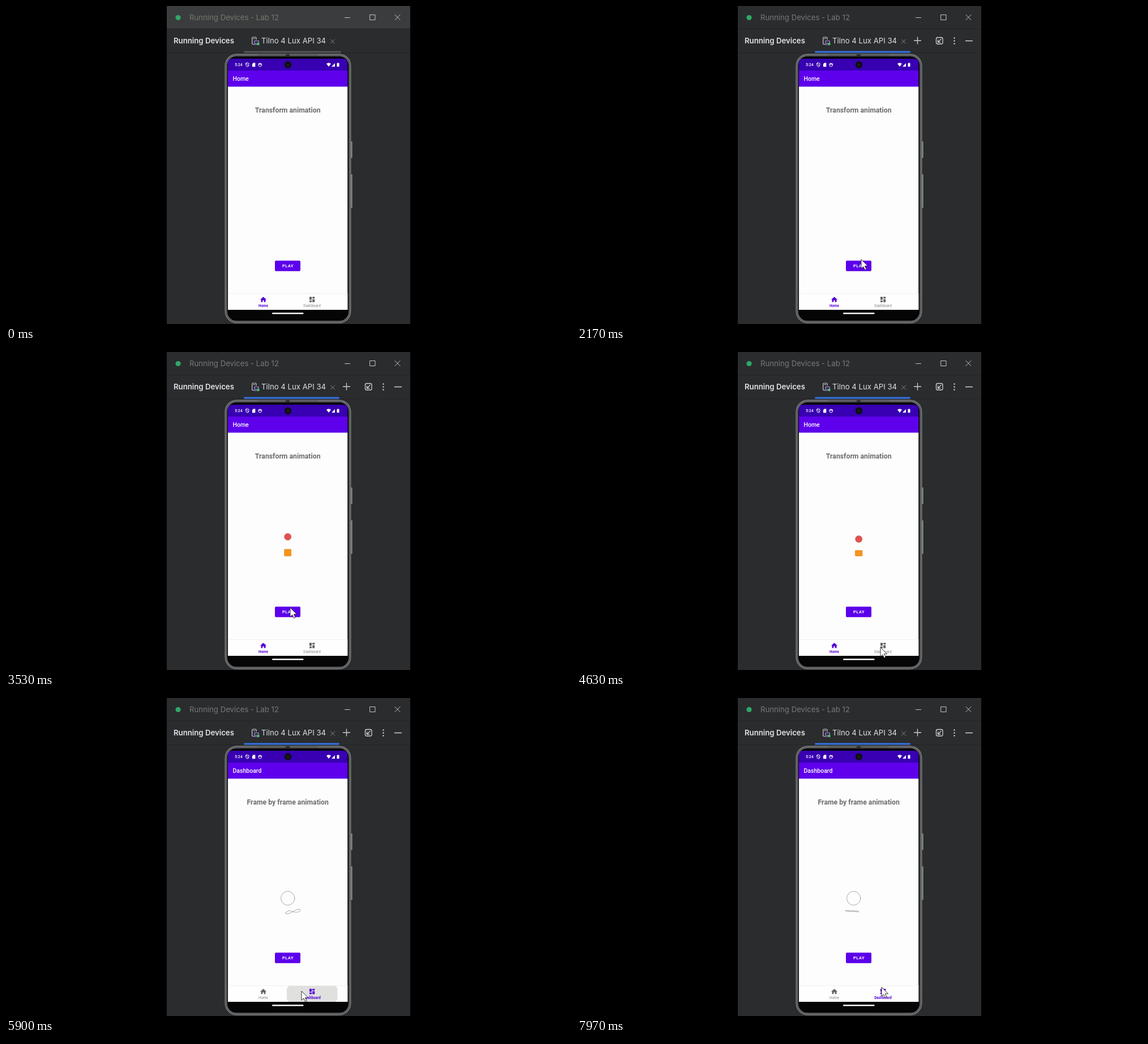
These frames come from a looping animation (998x561 px, 8 s). An HTML page:

```html
<!DOCTYPE html>
<html lang="en">
<head>
<meta charset="utf-8">
<title>Running Devices</title>
<style>
  html, body { margin: 0; width: 100%; height: 100%; overflow: hidden; background: #000; }
  svg { display: block; width: 100vw; height: 100vh; }
  text { white-space: pre; }
  .ide { font-family: Inter, sans-serif; font-size: 13.2px; }
  .app { font-family: Roboto, sans-serif; font-weight: 500; }
  .mid { text-anchor: middle; }
  .line { fill: none; stroke-linecap: round; }
</style>
</head>
<body>
<svg viewBox="0 0 998 561" preserveAspectRatio="none">
  <defs>
    <radialGradient id="glow">
      <stop offset="0" stop-color="#fff" stop-opacity=".42"/>
      <stop offset=".6" stop-color="#fff" stop-opacity=".2"/>
      <stop offset="1" stop-color="#fff" stop-opacity="0"/>
    </radialGradient>
    <filter id="soft" x="-20%" y="-50%" width="140%" height="220%"><feGaussianBlur stdDeviation="2"/></filter>
    <clipPath id="btnClip"><rect x="475" y="449.3" width="45" height="18.4" rx="1.8"/></clipPath>
  </defs>
  <rect width="998" height="561" fill="#000"/>

  <!-- IDE window -->
  <rect x="284" width="430" height="561" fill="#2a2c2e"/>
  <rect id="titleBar" x="284" width="430" height="40"/>
  <path d="M284 40.5H714M284 82.5H714" stroke="#222326"/>
  <circle cx="304" cy="20.5" r="4.6" fill="#2fa866"/>
  <text id="caption" class="ide" x="324" y="25">Running Devices - Lab 12</text>
  <path class="line" stroke="#c4c5c7" d="M598.5 20.5H607.5M643 15.5H652V24.5H643ZM687 15.5L696 24.5M696 15.5L687 24.5"/>
  <text class="ide" x="296" y="66" font-weight="600" fill="#e2e4e8">Running Devices</text>
  <g class="line" stroke="#cfd1d6" stroke-width="1.2">
    <path d="M438 67.5H436A1.5 1.5 0 0 1 434.7 66V56.5A1.5 1.5 0 0 1 436 55H440.5A1.5 1.5 0 0 1 442 56.5V59"/>
    <path d="M437 57.5H439.5"/>
    <path d="M439 61.5H446V66H439ZM438 68H443" stroke="#b18af5"/>
  </g>
  <circle cx="445.5" cy="67" r="2.2" fill="#49c96b"/>
  <text class="ide" x="451" y="66" fill="#dfe1e5">Tilno 4 Lux API 34</text>
  <path class="line" stroke="#85888d" d="M573.5 59L580.5 66M580.5 59L573.5 66"/>
  <rect id="tabLine" x="420" y="79.5" height="3" rx="1.5"/>
  <g id="tools" class="line" stroke="#ced0d6" stroke-width="1.3">
    <path d="M595.5 61H607.5M601.5 55V67M686.5 61.5H698.5"/>
    <rect x="634.5" y="55.5" width="11.5" height="11.5" rx="2.5"/>
    <path d="M643 58.5L637.8 63.7M637.5 59.8V64H641.7"/>
    <g fill="#ced0d6" stroke="none">
      <circle cx="666.5" cy="56.5" r="1.2"/><circle cx="666.5" cy="61.5" r="1.2"/><circle cx="666.5" cy="66.5" r="1.2"/>
    </g>
  </g>

  <!-- Phone body -->
  <path d="M610.5 239V268M610.5 297V356" stroke="#808284" stroke-width="2.5"/>
  <rect x="387.3" y="85.2" width="221.4" height="473.6" rx="20" fill="#3a3b3c" stroke="#858788" stroke-width="1.4"/>
  <rect x="389.8" y="87.7" width="216.4" height="468.6" rx="17.5" fill="#050505" stroke="#77797a" stroke-width="1.4"/>
  <path d="M444 86.5H551" stroke="#3a3b3c" stroke-width="1.5"/>
  <path d="M494 86.5H501" stroke="#0c0c0c" stroke-width="2"/>

  <!-- Screen -->
  <rect x="392" y="142" width="211.3" height="394" fill="#fdfdfd"/>
  <path d="M392 114V101Q392 93 400 93H595.3Q603.3 93 603.3 101V114Z" fill="#3800b2"/>
  <rect x="392" y="114" width="211.3" height="28.3" fill="#5f00ec"/>
  <circle cx="498" cy="103.5" r="6.3" fill="#101014"/>
  <path d="M496 104H500" stroke="#3c3c44"/>
  <text class="app" x="404" y="106.3" font-size="7" fill="#fff">5:24</text>
  <g class="line" stroke="#fff" stroke-width="1">
    <path d="M426.3 100.3L429 101.3V103.5Q429 106 426.3 107.3Q423.6 106 423.6 103.5V101.3ZM424.5 101.5L428.3 106"/>
    <circle cx="448.7" cy="103.8" r="2.9"/>
    <path d="M446.3 102.5H451.1" stroke-width="1.5"/>
  </g>
  <path fill="#fff" d="M435 102.3L437 100.2H440.3V107.2H435ZM566 101.8Q570 98.6 574 101.8L570 107ZM575 107L581 100.8V107ZM584.5 101H585.5V100.2H587.5V101H588.5V107H584.5Z"/>
  <text id="barTitle" class="app" x="400.5" y="132.3" font-size="10.5" fill="#fff"></text>
  <text id="heading" class="app mid" x="497.7" y="188.3" font-size="12.25" style="font-weight:700" fill="#6c6c6c"></text>

  <g id="shapes">
    <circle id="ball" cx="497.7" r="6" fill="#e0524f" stroke="#c34745" stroke-width=".6"/>
    <rect id="block" rx=".7" fill="#f7941d" stroke="#db8218" stroke-width=".6"/>
  </g>
  <g id="sketch" class="line" stroke="#66666a" stroke-width=".55">
    <circle id="ring" cy="353.3" r="12.2"/>
    <path id="loop" vector-effect="non-scaling-stroke" d="M-13 2.5C-11 -3 -3 -1.5 1 .5S12.5 1 13 -2.5C12.5 -6 5 -3 1 -.5S-13.5 7 -13 2.5Z"/>
  </g>

  <rect id="shadow" x="475" y="453" width="45" height="18" rx="2" fill="#000" filter="url(#soft)"/>
  <rect x="475" y="449.3" width="45" height="18.4" rx="1.8" fill="#5c00eb"/>
  <g clip-path="url(#btnClip)"><circle id="btnGlow" cx="498" cy="459" r="23" fill="url(#glow)"/></g>
  <text class="app mid" x="498" y="461.2" font-size="7.3" letter-spacing=".65" style="font-weight:700" fill="#fff">PLAY</text>

  <rect x="392" y="507.5" width="211.3" height="28.5" fill="#fefefe"/>
  <path d="M392 507.5H603.3" stroke="#f0f0f0"/>
  <rect id="ripple" x="496" y="508" width="89.5" height="28" rx="6" fill="#e0e0df"/>
  <g id="navHome">
    <path d="M454.5 513L460 518H458.5V522.3H455.7V519.3H453.3V522.3H450.5V518H449Z"/>
    <text class="app mid" x="454.5" y="530.7" font-size="6.3">Home</text>
  </g>
  <g id="navDash">
    <path d="M536 513H540V518.3H536ZM541.2 513H545.2V516H541.2ZM536 519.5H540V522.5H536ZM541.2 517.2H545.2V522.5H541.2Z"/>
    <text class="app mid" x="540.5" y="530.7" font-size="6.3">Dashboard</text>
  </g>
  <rect x="470" y="541" width="55.5" height="2.5" rx="1.25" fill="#f4f4f4"/>

  <path id="cursor" d="M0 0V16.2L3.8 12.8L6.7 18.6L9.2 17.4L6.4 11.7H11.5Z" fill="#fff" stroke="#222" stroke-width=".9" stroke-linejoin="round"/>
</svg>
<script>
const $ = id => document.getElementById(id);
const set = (id, attrs) => {
  for (const key in attrs) $(id).setAttribute(key, attrs[key]);
};
const clamp = (v, lo = 0, hi = 1) => Math.min(hi, Math.max(lo, v));
const ramp = (t, a, b) => clamp((t - a) / (b - a));
const ease = p => p * p * (3 - 2 * p);
const pulse = (t, inA, inB, outA, outB) => ramp(t, inA, inB) * (1 - ramp(t, outA, outB));
const show = (id, on) => set(id, { visibility: on ? 'visible' : 'hidden' });

const LOOP = 8000, FOCUS = 1000, PLAY_HOME = 2692, OPEN_DASH = 5750, PLAY_DASH = 6980;
const PURPLE = '#5600d8', GREY = '#656568', PALE = '#858588';

// time, x, y of the pointer tip
const trail = [
  [300, 640, 575], [950, 590, 544], [1650, 572, 537], [2170, 502, 447],
  [2600, 502, 456], [3000, 502, 456], [3530, 502, 451], [4240, 502, 452],
  [4630, 536, 521], [5300, 536, 521], [5800, 522, 517], [6050, 522, 517],
  [6650, 497, 457], [7050, 497, 457], [7550, 538, 503], [7970, 538, 510]
];

function pointer(t) {
  let i = 0;
  while (i < trail.length - 2 && t > trail[i + 1][0]) i++;
  const [t0, x0, y0] = trail[i], [t1, x1, y1] = trail[i + 1];
  const p = ease(ramp(t, t0, t1));
  return [x0 + (x1 - x0) * p, y0 + (y1 - y0) * p];
}

function setTab(id, on) {
  set(id, { fill: on ? PURPLE : GREY });
  const label = $(id).lastElementChild;
  label.setAttribute('fill', on ? PURPLE : PALE);
  label.style.fontWeight = on ? 700 : 400;
}

function render(t) {
  const active = t >= FOCUS, dash = t >= OPEN_DASH;

  set('titleBar', { fill: active ? '#2a2c2e' : '#3b3c3d' });
  set('caption', { fill: active ? '#77797c' : '#77776f' });
  set('tabLine', { width: active ? 169 : 172, fill: active ? '#3574e8' : '#55585b' });
  show('tools', active);

  $('barTitle').textContent = dash ? 'Dashboard' : 'Home';
  $('heading').textContent = dash ? 'Frame by frame animation' : 'Transform animation';
  setTab('navHome', !dash);
  setTab('navDash', dash);

  // bouncing ball presses the block
  show('shapes', !dash && t >= PLAY_HOME);
  const y = 329 - 7 * Math.cos((t - PLAY_HOME) / 711 * 2 * Math.PI);
  const h = 12 - clamp((y - 326) / 2, 0, 5), w = 12 + (12 - h) / 4;
  set('ball', { cy: y });
  set('block', { x: 497.7 - w / 2, y: 360 - h, width: w, height: h });

  // stepped sketch poses
  show('sketch', dash);
  const step = t < PLAY_DASH ? 0 : Math.floor((t - PLAY_DASH) / 160) % 4;
  const k = 1 - Math.abs(step - 2) / 2;
  set('ring', { cx: 497.7 - 9 * k });
  set('loop', { transform: `matrix(${1 - .08 * k} 0 0 ${1 - 1.3 * k} ${507 - 21 * k} ${376.7 - .7 * k})` });

  const press = Math.max(pulse(t, 2560, 2680, 2720, 2950), pulse(t, 6760, 6850, 6960, 7200));
  set('btnGlow', { opacity: press });
  set('shadow', { opacity: .4 * press });
  set('ripple', { opacity: pulse(t, 5580, 5740, 5940, 6180) });

  const [x, top] = pointer(t);
  set('cursor', { transform: `translate(${x} ${top})` });
}

const start = performance.now();
function tick(now) {
  render(Math.max(0, now - start) % LOOP);
  requestAnimationFrame(tick);
}
render(0);
requestAnimationFrame(tick);
</script>
</body>
</html>
```
